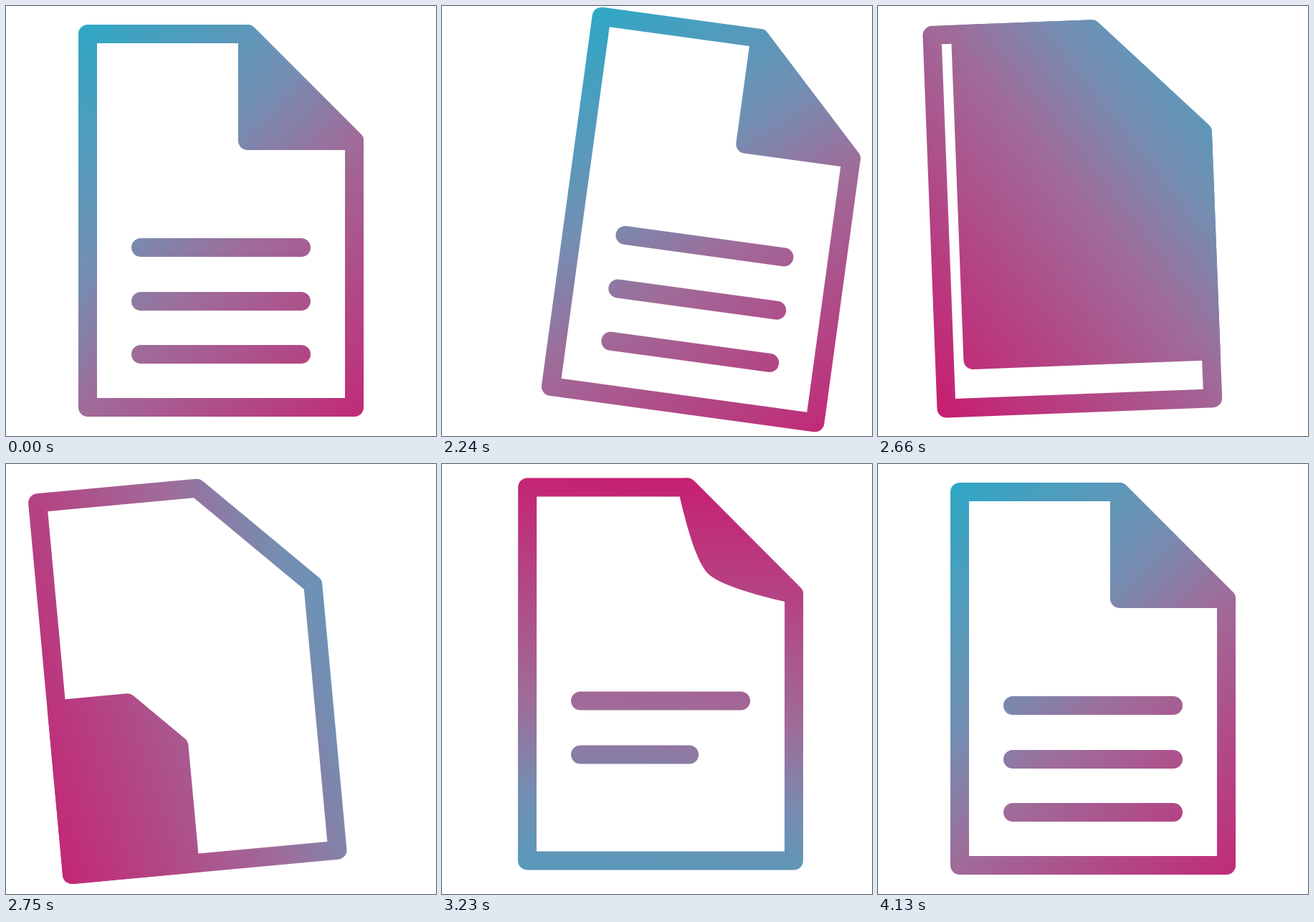
Write an HTML page with a canvas that moves like this. It is 600 px wide and 600 px high and loops after 4.43 s.

```html
<!DOCTYPE html>
<html lang="en">
<head>
<meta charset="utf-8">
<title>Page turn</title>
<style>
  html, body { margin: 0; width: 100%; height: 100%; overflow: hidden; background: #fff; }
  canvas { display: block; width: 600px; height: 600px; }
</style>
</head>
<body>
<canvas id="stage" width="600" height="600"></canvas>
<script>
const ctx = document.getElementById('stage').getContext('2d');
const LOOP = 4430, START = 2030, STEP = 30;
const CENTER = [300, 299.5], PIVOT = [345, 345];

// Page corners, starting at the top left
const TL = [114, 39], TOP = [337, 39], SIDE = [486, 188], BR = [486, 560], BL = [114, 560];
const FOLD = [337, 188], MID = [411.5, 113.5];
const LINES = [[337, 2750], [412, 3008], [486, 3265]];
const LINE_TIME = 360, COVERED = 2700;

const STOPS = [[0, '#29aac7'], [0.345, '#728fb3'], [0.518, '#9f6c99'], [1, '#cc156c']];

// [time, value] pairs
const moveX = [[2000, 0], [2030, 1.5], [2240, 71.5], [2310, 84], [2540, 34], [2660, -28.7],
  [2870, -58], [2960, -53], [3080, -25], [3400, 24], [3560, 12], [3650, 4.5], [3860, 0]];
const moveY = [[2000, 0], [2240, -1.5], [2540, -6], [2660, -5.5], [2960, 4.5], [3080, 0],
  [3400, -11], [3560, -7], [3860, 0]];
const tilt = [[2000, 0], [2030, 0.2], [2240, 7.8], [2310, 8.6], [2540, 5], [2660, -2.2],
  [2870, -7.4], [2960, -7], [3080, -5.5], [3400, 5], [3560, 3.1], [3650, 1.6], [3860, 0]];
const spin = [[2030, 0], [2240, 4], [2660, 99], [2960, 180], [3560, 289], [3800, 345], [3950, 360]];

const rad = deg => deg * Math.PI / 180;
const lerp = (a, b, p) => a + (b - a) * p;
const mix = (a, b, p) => [lerp(a[0], b[0], p), lerp(a[1], b[1], p)];
const span = (t, from, to) => Math.min(1, Math.max(0, (t - from) / (to - from)));
const sine = p => (1 - Math.cos(Math.PI * p)) / 2;

// Smooth curve through the keys that never overshoots them
function sample(keys, t) {
  const last = keys.length - 1;
  if (t <= keys[0][0]) return keys[0][1];
  if (t >= keys[last][0]) return keys[last][1];
  const slope = i => (keys[i + 1][1] - keys[i][1]) / (keys[i + 1][0] - keys[i][0]);
  const tangent = i => {
    if (i === 0 || i === last) return 0;
    const a = slope(i - 1), b = slope(i);
    return a * b <= 0 ? 0 : 2 * a * b / (a + b);
  };
  let i = 0;
  while (t >= keys[i + 1][0]) i++;
  const d = keys[i + 1][0] - keys[i][0], u = (t - keys[i][0]) / d, v = 1 - u;
  return v * v * (1 + 2 * u) * keys[i][1] + u * u * (3 - 2 * u) * keys[i + 1][1]
    + d * u * v * (v * tangent(i) - u * tangent(i + 1));
}

function trace(points) {
  ctx.beginPath();
  points.forEach(p => ctx.lineTo(...p));
}

function paint(t) {
  const angle = rad(45 + sample(spin, t));
  const along = d => [PIVOT[0] + d * Math.cos(angle), PIVOT[1] + d * Math.sin(angle)];
  const ink = ctx.createLinearGradient(...along(-417), ...along(361));
  STOPS.forEach(s => ink.addColorStop(...s));
  ctx.fillStyle = ctx.strokeStyle = ink;
}

function fillShape() {
  ctx.closePath();
  ctx.fill();
  ctx.stroke();
}

// The old fold grows over the page, then shrinks into the lower left corner
function drawTurningPage(t) {
  const grow = span(t, 2270, COVERED) ** 2;
  const leave = 1 - (1 - span(t, COVERED, 2850)) ** 2;
  if (leave === 1) return;
  const c = mix(FOLD, BL, grow);
  const shape = [TOP, [c[0], TOP[1]], c, [SIDE[0], c[1]], SIDE];
  trace(shape.map(p => mix(p, c, leave)));
  fillShape();
}

function drawNewFold(t) {
  const grow = sine(span(t, 2830, 3640));
  if (!grow) return;
  const [x, y] = mix(MID, FOLD, grow), h = 37 * (1 - grow);
  ctx.beginPath();
  ctx.moveTo(...TOP);
  ctx.bezierCurveTo(...TOP, x - h, y - h, x, y);
  ctx.bezierCurveTo(x + h, y + h, ...SIDE, ...SIDE);
  fillShape();
}

function drawLines(t) {
  for (const [y, from] of LINES) {
    const p = t < COVERED ? 1 : sine(span(t, from, from + LINE_TIME));
    if (!p) continue;
    trace([[188, y], [lerp(188, 412, p), y]]);
    ctx.stroke();
  }
}

function draw(t) {
  ctx.setTransform(1, 0, 0, 1, 0, 0);
  ctx.fillStyle = '#fff';
  ctx.fillRect(0, 0, 600, 600);
  ctx.translate(CENTER[0] + sample(moveX, t), CENTER[1] + sample(moveY, t));
  ctx.rotate(rad(sample(tilt, t)));
  ctx.translate(-CENTER[0], -CENTER[1]);
  ctx.lineWidth = 26;
  ctx.lineJoin = ctx.lineCap = 'round';
  paint(t);
  trace([TL, TOP, SIDE, BR, BL]);
  ctx.closePath();
  ctx.stroke();
  drawLines(t);
  drawTurningPage(t);
  drawNewFold(t);
}

const begin = performance.now();
function tick() {
  const t = (performance.now() - begin) % LOOP;
  draw(t < START ? 0 : START + Math.floor((t - START) / STEP) * STEP);
  requestAnimationFrame(tick);
}
tick();
</script>
</body>
</html>
```
